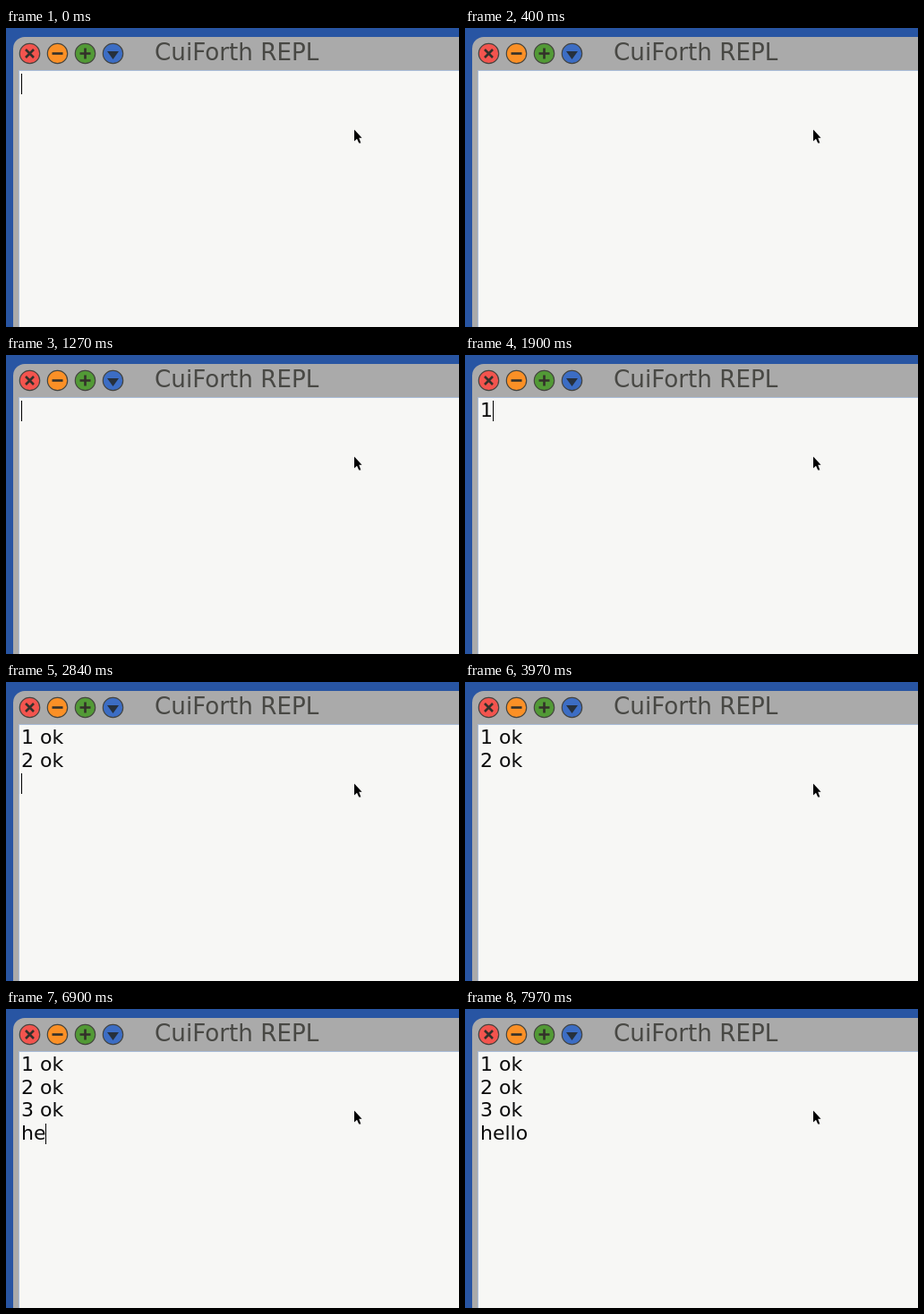
An HTML page for the animation above (8 s loop, 506 by 334 pixels).

```html
<!DOCTYPE html>
<html lang="en">
<head>
<meta charset="utf-8">
<title>CuiForth REPL</title>
<style>
  html, body { margin: 0; width: 100%; height: 100%; overflow: hidden; background: #2855a3; }
  svg { display: block; width: 100%; height: 100%; }
  text { font-family: "DejaVu Sans", sans-serif; }
  #lines { font-size: 22px; fill: #0c0c0c; }
</style>
</head>
<body>
<svg viewBox="0 0 506 334">
  <rect width="506" height="334" fill="#2855a3"/>
  <path d="M8 334V23A13 13 0 0 1 21 10H506V334Z" fill="#aaaaaa"/>
  <rect x="14" y="47" width="492" height="287" fill="#a9bcd8"/>
  <rect x="15" y="48" width="491" height="286" fill="#f7f7f5"/>
  <g id="buttons" stroke="#454540" stroke-width="1.2"></g>
  <g fill="none" stroke="#33302a" stroke-width="2.6">
    <path d="M22 24L31 33M31 24L22 33"/>
    <path d="M51.5 28.5H63.5"/>
    <path d="M82.5 28.5H94.5M88.5 22.5V34.5"/>
  </g>
  <path d="M113 26H126L119.5 35Z" fill="#26303c"/>
  <text x="166" y="36.4" font-size="26.2" fill="#484844">CuiForth REPL</text>
  <g id="lines"></g>
  <rect id="caret" width="1" height="23" fill="#000"/>
  <path d="M389 113.5V126.5L392 123.7L394.2 128.5H396.4L394.3 122.8H397.6Z" fill="#000" stroke="#fff" stroke-width="1" paint-order="stroke"/>
</svg>
<script>
const LOOP = 8000, LEFT = 17, PITCH = 25.6;
const NS = "http://www.w3.org/2000/svg";
const byId = id => document.getElementById(id);

function add(parent, tag, attrs) {
  const el = document.createElementNS(NS, tag);
  for (const key in attrs) el.setAttribute(key, attrs[key]);
  return parent.appendChild(el);
}

["#f3544e", "#fb9026", "#529a36", "#3c6dc4"].forEach((fill, i) =>
  add(byId("buttons"), "circle", { cx: 26.5 + 31 * i, cy: 28.5, r: 11.2, fill }));

// Text added at each time; the caret follows its end.
const edits = [
  [1600, "1"], [2400, " ok\n"], [2600, "2"], [2780, " ok\n"],
  [4600, "3"], [5000, " ok\n"],
  ...[..."hello"].map((letter, i) => [6480 + 235 * i, letter])
];

// Intervals with the caret hidden: blinks and the moment after a reply.
const hidden = [
  [340, 860], [2400, 2540], [2930, 3300], [3970, 4370],
  [5000, 5200], [5500, 5990], [6370, 6480], [7940, LOOP]
];

const lineTop = i => Math.round(i * PITCH);
const rows = [0, 1, 2, 3].map(i =>
  add(byId("lines"), "text", { x: LEFT, y: 69 + lineTop(i) }));
const caret = byId("caret");

function draw(t) {
  const typed = edits.filter(([at]) => at <= t).map(([, part]) => part).join("");
  const lines = typed.split("\n");
  rows.forEach((row, i) => { row.textContent = lines[i] || ""; });
  const last = lines.length - 1;
  const width = lines[last] ? rows[last].getComputedTextLength() : 0;
  caret.setAttribute("x", Math.round(LEFT + width));
  caret.setAttribute("y", 51 + lineTop(last));
  const off = hidden.some(([from, to]) => t >= from && t < to);
  caret.setAttribute("visibility", off ? "hidden" : "visible");
}

const start = performance.now();
function tick() {
  draw((performance.now() - start) % LOOP);
  requestAnimationFrame(tick);
}
tick();
</script>
</body>
</html>
```
